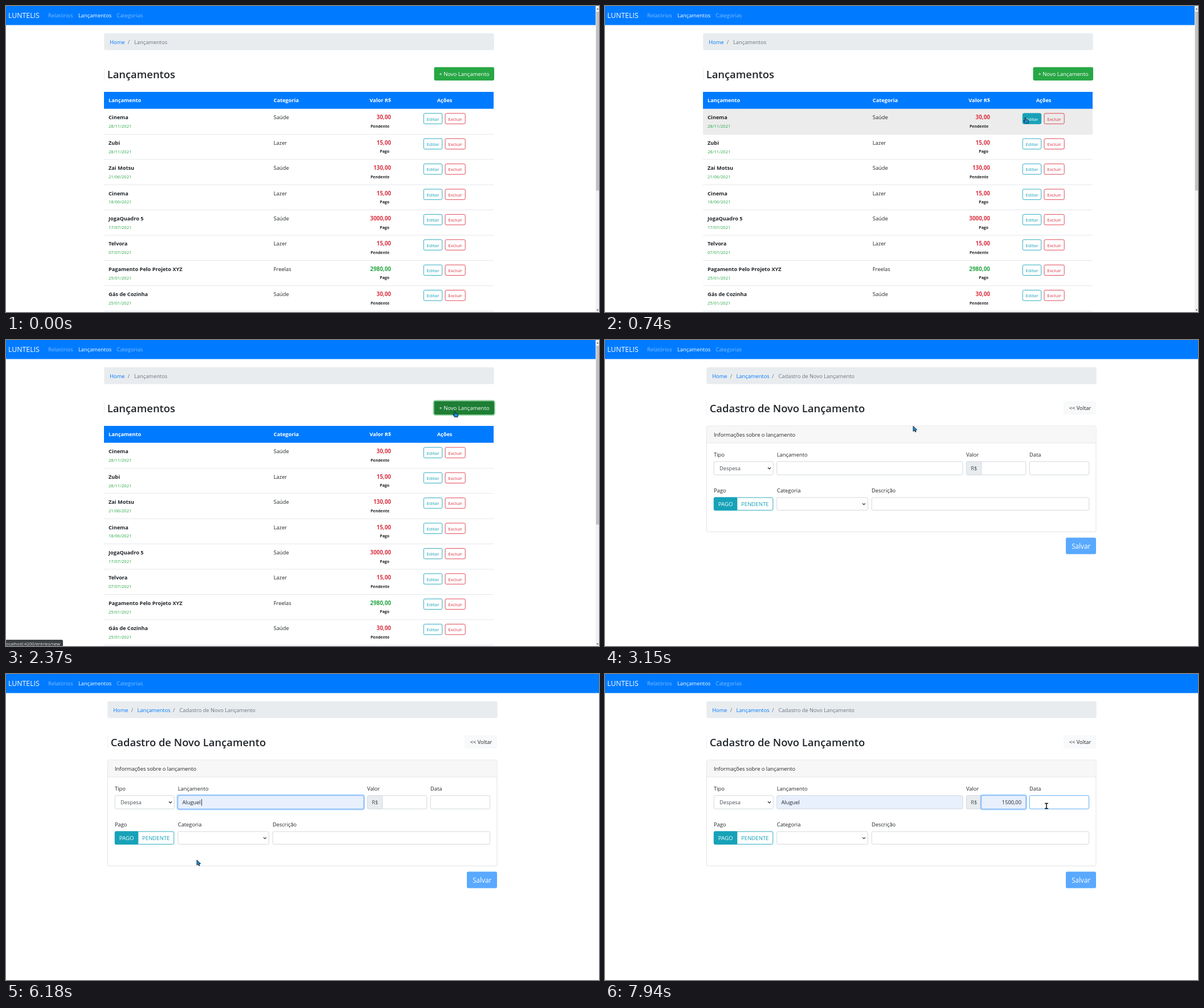
An HTML page that plays this animation: 1041x538 px, repeating every 8000 ms.

```html
<!DOCTYPE html>
<html lang="pt-BR">
<head>
<meta charset="utf-8">
<title>Lançamentos</title>
<style>
  html, body { margin: 0; width: 100%; height: 100%; overflow: hidden; background: #fff; }
  svg { display: block; width: 100vw; height: 100vh; font: 9.3px "Open Sans", "Noto Sans", sans-serif; }
  text { white-space: pre; }
</style>
</head>
<body>
<svg id="stage" viewBox="0 0 1041 538"></svg>
<script>
const LOOP = 8000;
const BLUE = '#007bff', GREEN = '#28a745', RED = '#dc3545', TEAL = '#17a2b8';
const INK = '#212529', GRAY = '#6c757d', FIELD = '#495057', LINE = '#ced4da';
const ROW_TOP = 181, ROW_H = 44.4;

// Markup helpers
const text = (x, y, str, fill = INK, attrs = '') =>
  `<text x="${x}" y="${y}" fill="${fill}" ${attrs}>${str}</text>`;
const rect = (x, y, x2, y2, fill, attrs = '') =>
  `<rect x="${x}" y="${y}" width="${x2 - x}" height="${y2 - y}" fill="${fill}" ${attrs}/>`;
const box = (x, y, x2, y2, fill = '#fff', stroke = LINE, attrs = '') =>
  rect(x, y, x2, y2, fill, `stroke="${stroke}" stroke-width=".9" rx="2.3" ${attrs}`);
const ring = (id, x, y, x2, y2) =>
  `<g id="${id}" fill="none">` +
  rect(x - 1, y - 1, x2 + 1, y2 + 1, 'none', 'rx="3" stroke="#007bff" stroke-opacity=".3" stroke-width="2.4"') +
  box(x, y, x2, y2, 'none', '#80bdff') + '</g>';
const chevron = (x, y) =>
  `<path d="M${x - 2.5} ${y - 1.2}l2.5 2.5 2.5-2.5" fill="none" stroke="#343a40" stroke-width="1.3"/>`;
const size = (px, more = '') => `font-size="${px}" ${more}`;
const BOLD = size(9.2, 'font-weight="700"');
const END = 'text-anchor="end"', MID = 'text-anchor="middle"';
const TITLE = size(18.4, 'font-weight="600"');

const navbar = rect(0, 0, 1041, 33.5, BLUE) +
  text(4, 20.6, 'LUNTELIS', '#fff', size(12.3)) +
  text(74, 19.8, 'Relatórios', '#fff', 'opacity=".5"') +
  text(127, 19.8, 'Lançamentos', '#fff') +
  text(194.3, 19.8, 'Categorias', '#fff', 'opacity=".5"');

const pageTop = (x, title) =>
  rect(x, 48, x + 684.5, 77.5, '#e9ecef', 'rx="2.5"') +
  text(x + 10, 66.8, 'Home', BLUE) + text(x + 41.5, 66.8, '/', GRAY) +
  rect(x, 108.5, x + .7, 131, '#e4e7ea') +
  text(x + 5.5, 126.8, title, INK, TITLE);

// Name, date, category, value, status, income flag
const entries = [
  ['Cinema', '28/11/2021', 'Saúde', '30,00', 'Pendente'],
  ['Zubi', '28/11/2021', 'Lazer', '15,00', 'Pago'],
  ['Zai Motsu', '21/06/2021', 'Saúde', '130,00', 'Pendente'],
  ['Cinema', '18/06/2021', 'Lazer', '15,00', 'Pago'],
  ['JogaQuadro 5', '17/07/2021', 'Saúde', '3000,00', 'Pago'],
  ['Telvora', '07/07/2021', 'Lazer', '15,00', 'Pendente'],
  ['Pagamento Pelo Projeto XYZ', '25/01/2021', 'Freelas', '2980,00', 'Pago', true],
  ['Gás de Cozinha', '25/01/2021', 'Saúde', '30,00', 'Pendente'],
];

const entryRow = ([name, date, category, value, status, income], i) =>
  `<g transform="translate(0 ${i * ROW_H})">` +
  rect(172, 181, 856, 225, '#ececec', `id="row${i}"`) +
  rect(172, 225, 856, 225.8, '#dee2e6') +
  text(180, 199.4, name, INK, BOLD) +
  text(180, 214.2, date, GREEN, size(7.6)) +
  text(469.8, 199.4, category) +
  text(676, 199.4, value, income ? GREEN : RED, size(9.9, `font-weight="700" ${END}`)) +
  text(673, 214, status, INK, size(6.9, `font-weight="700" ${END}`)) +
  box(733.2, 188.8, 765.7, 207.2, 'none', TEAL, `id="edit${i}"`) +
  text(749.5, 201.6, 'Editar', TEAL, size(8, `${MID} id="editText${i}"`)) +
  box(771, 188.8, 806.2, 207.2, 'none', RED, `id="drop${i}"`) +
  text(788.6, 201.6, 'Excluir', RED, size(8, `${MID} id="dropText${i}"`)) + '</g>';

const listPage = '<g id="list">' + pageTop(172.2, 'Lançamentos') +
  text(225, 66.8, 'Lançamentos', GRAY) +
  rect(750.5, 106.5, 858, 132, 'none', 'id="newRing" rx="3.4" stroke="#93d3a2" stroke-width="2"') +
  rect(751.5, 107.5, 857, 131, GREEN, 'id="newButton" rx="2.4"') +
  text(804.5, 122.8, '+ Novo Lançamento', '#fff', size(9.5, MID)) +
  rect(172, 151, 856, 180.7, BLUE) +
  text(180, 169.4, 'Lançamento', '#fff', BOLD) +
  text(469.8, 169.4, 'Categoria', '#fff', BOLD) +
  text(676, 169.4, 'Valor R$', '#fff', `${BOLD} ${END}`) +
  text(770, 169.4, 'Ações', '#fff', `${BOLD} ${MID}`) +
  entries.map(entryRow).join('') +
  rect(1035, 0, 1041, 538, '#f1f1f1') + rect(1035.8, 10, 1041, 324.5, '#c1c1c1') +
  '<path d="M1036.5 6.2l2-2.4 2 2.4zM1036.5 533.5l2 2.4 2-2.4z" fill="#606060"/></g>';

const formPage = '<g id="form">' + pageTop(178.2, 'Cadastro de Novo Lançamento') +
  text(230.5, 66.8, 'Lançamentos', BLUE) + text(293, 66.8, '/', GRAY) +
  text(304.5, 66.8, 'Cadastro de Novo Lançamento', GRAY) +
  rect(805, 107.5, 862, 131, '#f8f9fa', 'rx="2.4"') +
  text(834, 122.8, '&lt;&lt; Voltar', INK, MID) +
  box(178.4, 151.2, 862, 337.3, '#fff', '#dfdfdf') +
  rect(178.9, 151.7, 861.6, 181, '#f7f7f7') + rect(178.4, 180.6, 862, 181.4, '#dfdfdf') +
  text(191, 169.9, 'Informações sobre o lançamento') +
  text(191, 205, 'Tipo') + text(301.8, 205, 'Lançamento') + text(634, 205, 'Valor') + text(745, 205, 'Data') +
  text(191, 268, 'Pago') + text(301.8, 268, 'Categoria') + text(468, 268, 'Descrição') +
  box(191.2, 213.7, 295.3, 237.2) + text(201, 228.9, 'Despesa', FIELD) + chevron(288.5, 225.5) +
  box(301.7, 213.7, 628, 237.2, '#fff', LINE, 'id="nameBox"') +
  box(634.4, 213.7, 662, 237.2, '#e9ecef') + text(647.7, 228.9, 'R$', FIELD, MID) +
  box(660.7, 213.7, 738.8, 237.2, '#fff', LINE, 'id="valueBox"') +
  box(745.2, 213.7, 849.6, 237.2, '#fff', LINE, 'id="dateBox"') +
  ring('typeRing', 191.2, 213.7, 295.3, 237.2) +
  ring('nameRing', 301.7, 213.7, 628, 237.2) +
  ring('valueRing', 660.7, 213.7, 738.8, 237.2) +
  text(309.5, 228.9, 'Aluguel', INK, 'id="nameText"') +
  rect(343, 220, 343.8, 231.5, '#000', 'id="caret"') +
  text(731, 228.9, '1500,00', INK, `id="valueText" ${END}`) +
  box(191.2, 277, 294.8, 299.3, '#fff', TEAL) +
  rect(191, 276.6, 232.3, 299.7, TEAL, 'rx="2"') +
  text(211.6, 291.5, 'PAGO', '#fff', size(9.6, MID)) +
  text(263.3, 291.5, 'PENDENTE', TEAL, size(9.6, MID)) +
  box(301.7, 277, 461.5, 299.3) + chevron(454.5, 288.3) +
  box(468.3, 277, 849.6, 299.3) +
  rect(809, 347.5, 862, 376.5, '#59a9ff', 'rx="2.8"') +
  text(835.7, 366.5, 'Salvar', '#fff', size(11.7, MID)) +
  '<g id="options">' + rect(191.5, 237.3, 295, 264.8, '#fff', 'stroke="#767676" stroke-width=".8"') +
  rect(192, 251, 294.7, 264.6, '#1e90ff', 'id="optionMark"') +
  text(201.5, 247.6, 'Despesa', FIELD, 'id="option0"') +
  text(201.5, 261.4, 'Receita', FIELD, 'id="option1"') + '</g></g>';

const statusBar = '<g id="status"><path d="M0 527h97.5q2.5 0 2.5 2.5V538H0z" fill="#3c4043"/>' +
  text(95, 537, 'localhost:4200/entries/new', '#e8eaed', size(7.7, END)) + '</g>';

const cursors = '<g id="cursor"><g stroke="#14202c" stroke-width=".9" stroke-linejoin="round" fill="#1b8fd0">' +
  '<path id="arrow" d="M.5.5V9.6L2.7 7.7 4.1 10.8 5.7 10.1 4.3 7.1 7.2 6.9z"/>' +
  '<path id="hand" d="M-1 1.2q1-1.8 2 0V4.2l3.4.8q1.6.5 1.3 2.2L5 10.6H-.5L-3.1 7q-.3-1.5 1-1L-1 7z"/></g>' +
  '<path id="beam" d="M-3-4.5H3M0-4.5V4.5M-3 4.5H3" stroke="#111" stroke-width="1.5"/></g>';

const stage = document.getElementById('stage');
stage.innerHTML = navbar + listPage + formPage + statusBar + cursors;
const el = {};
stage.querySelectorAll('[id]').forEach(node => el[node.id] = node);

// Pointer moves: first step time, last step time, number of steps, end point
const moves = [
  [430, 430, 1, 1017, 310], [500, 740, 4, 738, 195.5], [820, 820, 1, 740, 196],
  [970, 1740, 11, 788, 124], [1820, 1820, 1, 788, 124.8],
  [2910, 3150, 4, 540.5, 151], [3230, 3690, 7, 287, 227], [3760, 3760, 1, 286.5, 226.5],
  [4560, 4710, 3, 257.8, 261], [4790, 4790, 1, 257.5, 260.5],
  [5110, 5260, 3, 258, 244], [5340, 5560, 4, 331, 230],
  [6100, 6100, 1, 334.5, 326.5],
  [6350, 6880, 8, 693, 224], [7180, 7180, 1, 647.5, 310.5], [7410, 7940, 8, 775, 232],
];

function pointerAt(t) {
  let x = 1070, y = 330;
  for (const [start, end, steps, toX, toY] of moves) {
    if (t < start) break;
    const step = steps > 1 ? Math.floor((t - start) / (end - start) * (steps - 1) + .12) : 0;
    const u = Math.min(1, (step + 1) / steps);
    x += (toX - x) * u;
    y += (toY - y) * u;
  }
  return [x, y];
}

const between = (t, a, b) => t >= a && t < b;
const fade = (t, a, b) => Math.max(0, Math.min(1, (t - a + 60) / 150, 1 - (t - b + 60) / 150));
const show = (node, on) => node.setAttribute('visibility', on ? 'visible' : 'hidden');
const fill = (node, color) => node.setAttribute('fill', color);

function draw(t) {
  const [x, y] = pointerAt(t);
  const inside = (x1, y1, x2, y2) => x >= x1 && x <= x2 && y >= y1 && y <= y2;
  const onList = t < 2450;
  let kind = 'arrow';

  el.list.style.display = onList ? '' : 'none';
  el.form.style.display = onList ? 'none' : '';
  show(el.status, between(t, 1740, 2910));

  if (onList) {
    entries.forEach((_, i) => {
      const top = ROW_TOP + i * ROW_H;
      const button = (id, x1, x2, color) => {
        const over = inside(x1, top + 7.5, x2, top + 26.5);
        fill(el[id + i], over ? color : 'none');
        fill(el[id + 'Text' + i], over ? '#fff' : color);
        if (over) kind = 'hand';
      };
      show(el['row' + i], inside(172, top, 856, top + ROW_H - .4));
      button('edit', 733, 766, TEAL);
      button('drop', 771, 806.5, RED);
    });
    const overNew = inside(751, 107, 857, 131), pressed = t >= 2270;
    if (overNew) kind = 'hand';
    fill(el.newButton, pressed ? '#1e7e34' : overNew ? '#218838' : GREEN);
    show(el.newRing, pressed);
  } else {
    const open = between(t, 4310, 5340);
    const pick = y >= 251 ? 1 : 0;
    el.options.style.display = open ? '' : 'none';
    el.optionMark.setAttribute('y', pick ? 251 : 237.6);
    fill(el.option0, pick ? FIELD : '#fff');
    fill(el.option1, pick ? '#fff' : FIELD);

    el.typeRing.setAttribute('opacity', fade(t, 4240, 5940));
    el.nameRing.setAttribute('opacity', fade(t, 5940, 7110));
    el.valueRing.setAttribute('opacity', fade(t, 7110, 9000));

    const named = t >= 6180, valued = t >= 7330;
    el.nameText.style.display = named ? '' : 'none';
    el.caret.style.display = between(t, 5940, 7110) ? '' : 'none';
    el.caret.setAttribute('x', named ? 343 : 309.5);
    el.valueText.style.display = valued ? '' : 'none';
    fill(el.nameBox, named ? '#e8f0fe' : '#fff');
    fill(el.valueBox, valued ? '#e8f0fe' : '#fff');
    el.dateBox.setAttribute('stroke', t >= 7940 ? '#4aa3ee' : LINE);

    const overInput = inside(301.5, 213.5, 628, 237.5) || inside(660.5, 213.5, 739, 237.5) ||
      inside(745, 213.5, 850, 237.5) || inside(468, 276.5, 850, 299.5);
    if (overInput && !open) kind = 'beam';
    if (t < 2910) kind = 'hand';
  }

  el.cursor.setAttribute('transform', `translate(${x} ${y})`);
  for (const id of ['arrow', 'hand', 'beam']) el[id].style.display = id === kind ? '' : 'none';
}

const begin = performance.now();
function tick() {
  draw((performance.now() - begin) % LOOP);
  requestAnimationFrame(tick);
}
tick();
</script>
</body>
</html>
```
